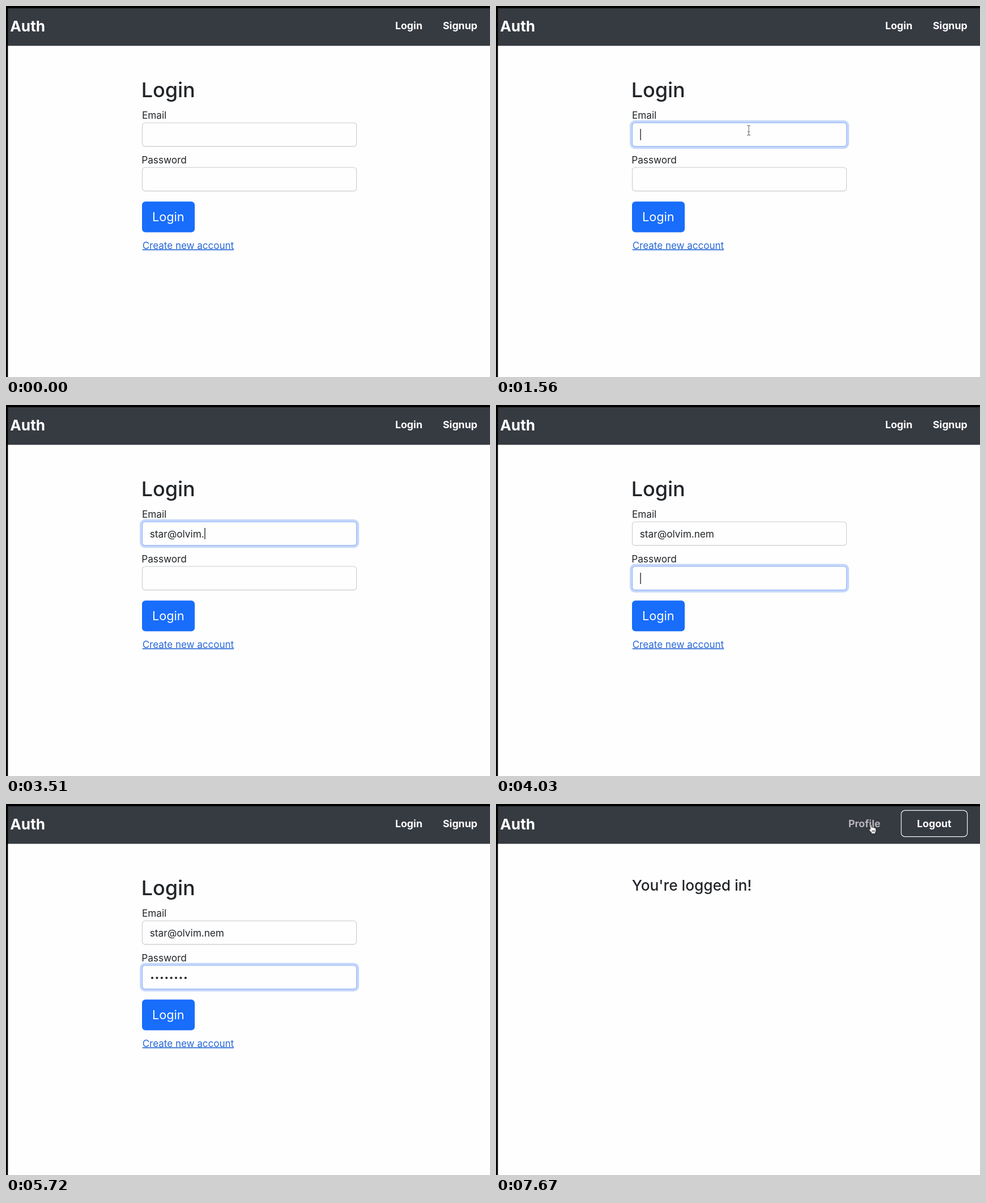
An HTML page that plays this animation: 854x655 px, repeating every 8000 ms.

```html
<!DOCTYPE html>
<html lang="en">
<head>
<meta charset="utf-8">
<title>Auth</title>
<style>
  html, body { margin: 0; width: 100%; height: 100%; overflow: hidden; background: #fefefe; }
  svg { display: block; width: 854px; height: 655px; }
  text { font: 400 17.2px Inter, "Liberation Sans", sans-serif; font-optical-sizing: none; fill: #212529; }
  .mid { text-anchor: middle; }
  .nav { font-weight: 700; font-size: 17.8px; fill: #fff; }
  .brand { font-weight: 700; font-size: 26.3px; fill: #fff; }
  .title { font-weight: 500; font-size: 36px; }
  .note { font-weight: 500; font-size: 26.2px; }
  .btn { font-size: 21.7px; fill: #fff; }
  .link { font-size: 17px; fill: #2a69d8; text-decoration: underline; }
  .field { fill: #fefefe; stroke: #c9cbd0; stroke-width: 1.1; }
  .ring { fill: #c7d7fb; visibility: hidden; }
  .focus .ring { visibility: visible; }
  .focus .field { stroke: #8fb3f6; }
  .hover { fill: #b6b4b9; }
  #arrow path { fill: #111; stroke: #fff; stroke-width: 1; }
  #ibeam path { fill: none; stroke: #77787c; stroke-width: 1.2; }
  #hand path { fill: #fff; stroke: #26282c; stroke-width: .9; stroke-linejoin: round; }
</style>
</head>
<body>
<svg viewBox="0 0 854 655">
  <rect width="854" height="655" fill="#fefefe"/>
  <rect x="3" y="4" width="851" height="66.3" fill="#363a41"/>
  <path d="M0 0H854V4H3.4V655H0Z" fill="#000"/>
  <text class="mid brand" x="38.2" y="45">Auth</text>

  <g id="loginPage">
    <text class="mid nav" x="710.7" y="41.2">Login</text>
    <text class="mid nav" x="801.2" y="41.2">Signup</text>
    <text class="mid title" x="286.2" y="161">Login</text>
    <text class="mid" x="261.6" y="198.8">Email</text>
    <g id="emailBox">
      <rect class="ring" x="236" y="201.7" width="387" height="50.6" rx="9.5"/>
      <rect class="field" x="240.5" y="206.3" width="378" height="41.6" rx="5"/>
    </g>
    <text id="email" x="253.8" y="233.6"></text>
    <text class="mid" x="279" y="277.7">Password</text>
    <g id="passBox">
      <rect class="ring" x="236" y="280.4" width="387" height="50.6" rx="9.5"/>
      <rect class="field" x="240.5" y="285" width="378" height="41.6" rx="5"/>
    </g>
    <g id="dots" fill="#212529"></g>
    <rect id="caret" width="1.3" height="20" fill="#16181b"/>
    <rect x="240" y="345.2" width="93" height="54.2" rx="6" fill="#186dfb"/>
    <text class="mid btn" x="286.2" y="380">Login</text>
    <text class="mid link" x="321.4" y="428.5">Create new account</text>
  </g>

  <g id="homePage">
    <text id="profile" class="mid nav" x="650" y="41.2">Profile</text>
    <rect x="715" y="11.3" width="116.6" height="46.4" rx="6.5" fill="none" stroke="#f4f4f5" stroke-width="1.2"/>
    <text class="mid nav" x="773.1" y="41.2">Logout</text>
    <text class="mid note" x="345.6" y="152.6">You're logged in!</text>
  </g>

  <g id="arrow"><path d="M0 0V15L3.6 11.6 6 17 8.3 16 6 10.7H11Z"/></g>
  <g id="ibeam"><path d="M-3-8.5Q0-8.5 0-6.5Q0-8.5 3-8.5M0-6.5V7M-3 9Q0 9 0 7Q0 9 3 9M-1.8 2.5H1.8"/></g>
  <g id="hand">
    <path d="M-1.4 1.2Q0-.8 1.3 1.2L1.5 5Q2.8 3.8 4 5.4Q5.4 4.4 6.4 6Q8 5.4 8.7 7.4L8.8 11Q8.6 13.5 7.4 14.5V16.2H1V14.5L-3.4 9.6Q-3.6 7.4-1.3 8.6Z"/>
    <path d="M2.2 9.8v3.4M4.2 9.8v3.4M6.2 9.8v3.4"/>
  </g>
</svg>
<script>
  const LOOP = 8000, TICK = 130;
  const FOCUS = 1430, TAB = 4030, BLINK = 5720, ENTER = 6110, HOVER = 7540;
  const ADDRESS = "star@olvim.nem";
  const $ = id => document.getElementById(id);
  const run = (from, n) => Array.from({ length: n }, (_, i) => from + i * TICK);
  const emailKeys = [...run(1820, 2), ...run(2210, 2), 2600, ...run(2860, 9)];
  const passKeys = [...run(4160, 5), ...run(4940, 3)];
  const typed = (keys, t) => keys.filter(k => k <= t).length;
  const show = (id, on) => { $(id).style.display = on ? "" : "none"; };

  const dots = passKeys.map((_, i) => {
    const c = document.createElementNS("http://www.w3.org/2000/svg", "circle");
    c.setAttribute("cx", 258 + i * 8.4);
    c.setAttribute("cy", 307);
    c.setAttribute("r", 2.1);
    return $("dots").appendChild(c);
  });

  function glide(t, start, end, from, to) {
    const u = Math.min(1, Math.max(0, (t - start) / (end - start)));
    const e = 1 - (1 - u) ** 2;
    return from.map((v, i) => v + (to[i] - v) * e);
  }

  function pointer(t) {
    if (t >= 910 && t < 2600) {
      const p = glide(t, 910, FOCUS, [770, 56], [446, 219.3]);
      return [p[0] < 619 && p[1] > 206 ? "ibeam" : "arrow", p];
    }
    if (t >= HOVER) return ["hand", glide(t, HOVER - TICK, HOVER + TICK, [660, 45], [661.6, 36.3])];
    if (t >= 6630) return ["arrow", glide(t, 6630, 7150, [621.5, 94], [660, 45.5])];
    return [null];
  }

  function draw(t) {
    const inPass = t >= TAB, count = typed(passKeys, t);
    show("loginPage", t < ENTER);
    show("homePage", t >= ENTER);
    $("emailBox").classList.toggle("focus", t >= FOCUS && !inPass);
    $("passBox").classList.toggle("focus", inPass);
    $("profile").classList.toggle("hover", t >= HOVER);

    const n = typed(emailKeys, t), email = $("email");
    email.textContent = ADDRESS.slice(0, n);
    dots.forEach((d, i) => { d.style.display = i < count ? "" : "none"; });

    show("caret", t >= FOCUS && t < BLINK);
    if (t < ENTER) {
      const x = inPass ? 254.4 + count * 8.3 : 254.4 + (n ? email.getComputedTextLength() : 0);
      $("caret").setAttribute("x", x);
      $("caret").setAttribute("y", inPass ? 296 : 217);
    }

    const [kind, pos] = pointer(t);
    for (const id of ["arrow", "ibeam", "hand"]) show(id, id === kind);
    if (kind) $(kind).setAttribute("transform", `translate(${pos})`);
  }

  function frame() {
    const t = performance.now() % LOOP;
    draw(Math.floor(t / TICK) * TICK);
    requestAnimationFrame(frame);
  }
  frame();
</script>
</body>
</html>
```
